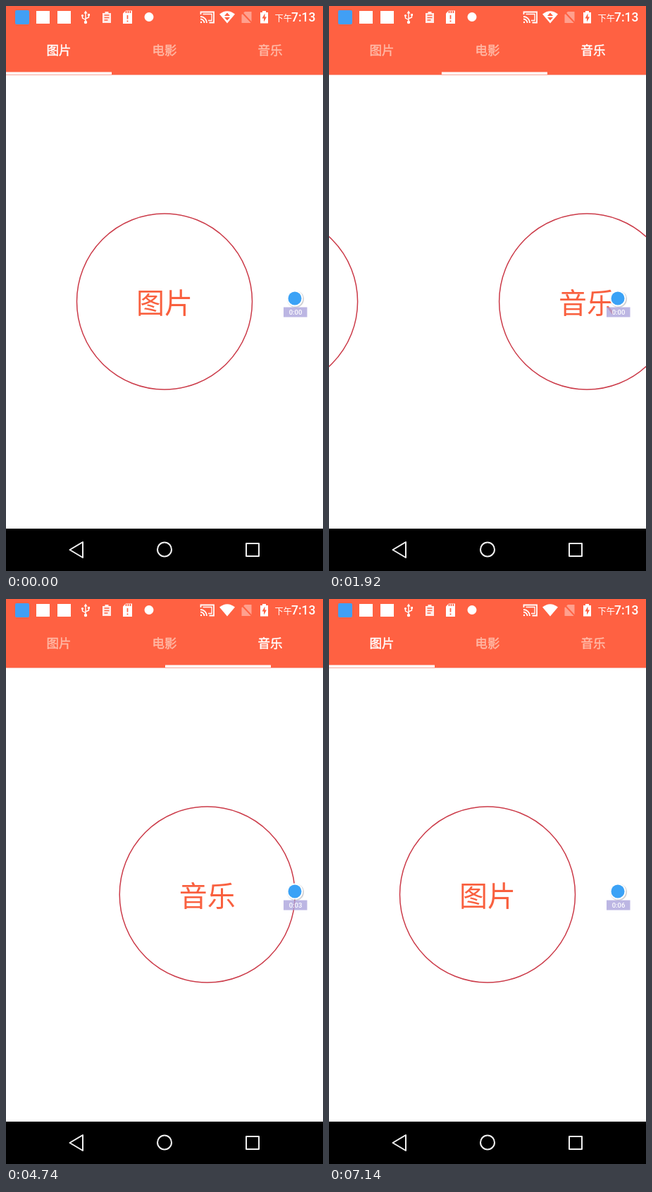
An HTML page for the animation above (7320 ms loop, 450 by 800 pixels).

```html
<!DOCTYPE html>
<html lang="zh-CN">
<head>
<meta charset="utf-8">
<title>Tabs</title>
<style>
html, body { margin: 0; width: 100%; height: 100%; overflow: hidden; background: #fff; }
svg { display: block; width: 100%; height: 100%; }
text { font-family: "Noto Sans CJK SC", "Noto Sans CJK", "Noto Sans", sans-serif; }
.tab { font-size: 17.5px; text-anchor: middle; stroke-width: .45; }
.label { font-size: 40px; text-anchor: middle; fill: #f9603f; }
.ring { fill: none; stroke: #cb3a48; stroke-width: 1.5; }
.clock { font-family: Roboto, sans-serif; font-size: 17.5px; font-weight: 500; }
.timer { font: 500 9.5px Roboto, sans-serif; text-anchor: middle; fill: #fff; }
</style>
</head>
<body>
<svg viewBox="0 0 450 800">
  <rect width="450" height="800" fill="#fff"/>
  <g id="pages"></g>

  <!-- tab bar -->
  <rect width="450" height="97.5" fill="#ff6142"/>
  <rect y="97" width="450" height="1" fill="#f7a79b"/>
  <g id="tabs"></g>
  <rect id="bar" y="93.5" width="150" height="3.5" fill="#fff"/>

  <!-- status bar, left -->
  <rect x="13" y="6" width="20" height="20" rx="2" fill="#419ff5"/>
  <rect x="43" y="7" width="19" height="18" fill="#fff"/>
  <rect x="73" y="7" width="19" height="18" fill="#fff"/>
  <g fill="none" stroke="#fff" stroke-width="1.4">
    <path d="M113 9V23M113 19.5L108.500 17V13.500M113 18L117.500 16V12.500"/>
    <path d="M110.500 10.500L113 6.500L115.500 10.500Z" fill="#fff" stroke="none"/>
    <circle cx="113" cy="23" r="2.200" fill="#fff" stroke="none"/>
    <circle cx="108.500" cy="13.500" r="1.600" fill="#fff" stroke="none"/>
    <rect x="116" y="11" width="3" height="3" fill="#fff" stroke="none"/>
  </g>
  <g opacity=".88">
    <path d="M137 10H140.500V8H145.500V10H149V24H137Z" fill="#fff"/>
    <path d="M139.500 13H146.500M139.500 16.500H146.500M139.500 20H144.500" stroke="#ff6142" stroke-width="1.300"/>
  </g>
  <path d="M170 6.500H179V25H166V10.500Z" fill="#fff"/>
  <path d="M172.500 13V18.500M172.500 20.500V22.500M170.500 7V10M173.500 7V10M176.500 7V10" stroke="#ff6142" stroke-width="1.700"/>
  <circle cx="203" cy="15.500" r="6.500" fill="#fff"/>

  <!-- status bar, right -->
  <g fill="none" stroke="#fff" stroke-width="1.800">
    <path d="M276.500 12V8.500H295V23.500H288.500"/>
    <path d="M276 15A9 9 0 0 1 285 24M276 18.500A5.500 5.500 0 0 1 281.500 24"/>
    <path d="M279.500 11.500H292V20.500H287" stroke-width="1.300"/>
    <circle cx="277" cy="23" r="1.200" fill="#fff" stroke="none"/>
  </g>
  <path d="M303 11.500Q314 3 325 11.500L314 24.500Z" fill="#fff"/>
  <path id="traffic" d="M310 14L314 9.500L318 14ZM310 16H318L314 20.500Z" fill="#ff6142"/>
  <g opacity=".4">
    <path d="M339 8H348.500V24H334.500V12.500Z" fill="#fff"/>
    <path d="M334 8L350 25" stroke="#ff6142" stroke-width="2"/>
  </g>
  <path d="M361 9H364V7H369V9H372V24.500H361Z" fill="#fff"/>
  <path d="M367.500 10.500L363.500 17.500H366V22.500L370 15.500H367.500Z" fill="#ff6142"/>
  <text x="381.500" y="21.500" font-size="12.300" fill="#fff">下午</text>
  <text class="clock" x="439.500" y="22" text-anchor="end" fill="#fff">7:13</text>

  <!-- floating recorder button -->
  <circle cx="411" cy="415" r="12" fill="#8c8c94" opacity=".4"/>
  <circle cx="410" cy="414" r="11.500" fill="#fff"/>
  <circle cx="410" cy="414" r="9.500" fill="#3ba2f6"/>
  <rect x="394" y="426.500" width="33.500" height="14" fill="#a9a2dc" opacity=".78"/>
  <text id="timer" class="timer" x="411" y="437"></text>

  <!-- navigation bar -->
  <rect y="740" width="450" height="60" fill="#000"/>
  <g fill="none" stroke="#f0f0f0" stroke-width="2" stroke-linejoin="round">
    <path d="M109 759V781L90.500 770Z"/>
    <circle cx="225" cy="769.500" r="10"/>
    <rect x="341" y="761" width="18" height="18"/>
  </g>
</svg>
<script>
const LOOP = 7320, STEP = 60, PAGE = 450, TAB = 150;
const names = ["图片", "电影", "音乐"];

// Tap time, resume time, settle time, from, to, progress at tap, progress per step
const moves = [
  [480, 660, 1680, 0, 1, .01, .045],
  [1680, 1740, 2460, 1, 2, .011, .049],
  [2820, 3660, 4080, 2, 0, .01, .1],
  [4080, 4560, 4980, 0, 2, .0168, .1],
  [4980, 5400, 5820, 2, 1, .01, .1],
  [5820, 6180, 6600, 1, 0, .01, .1]
];
const seconds = [[0, 0], [2820, 2], [4080, 3], [4980, 4], [5820, 5], [7140, 6]];

// The bar starts after the page and runs for a shorter part of the move
const BAR_DELAY = .138, BAR_SPAN = .4167;

const $ = id => document.getElementById(id);
const clamp = v => Math.min(1, Math.max(0, v));
const mix = (a, b, p) => a + (b - a) * p;
const quintOut = p => 1 - (1 - p) ** 5;
const cosInOut = p => (1 - Math.cos(Math.PI * p)) / 2;
const latest = (rows, now) => rows.filter(row => row[0] <= now).pop();

$("pages").innerHTML = names.map((name, i) => `
  <g transform="translate(${i * PAGE} 0)">
    <circle class="ring" cx="225" cy="418.5" r="124.5"/>
    <text class="label" x="225" y="435">${name}</text>
  </g>`).join("");
$("tabs").innerHTML = names.map((name, i) =>
  `<text class="tab" x="${(i + .5) * TAB}" y="69">${name}</text>`).join("");
const tabs = [...$("tabs").children];

function stateAt(now) {
  const move = latest(moves, now);
  if (!move) return { page: 0, bar: 0, active: 0 };
  const [tap, resume, settle, from, to, first, rate] = move;
  let p = first;
  if (now >= settle) p = 1;
  else if (now >= resume) p = clamp(first + rate * (1 + (now - resume) / STEP));
  return {
    page: mix(from, to, quintOut(p)),
    bar: mix(from, to, cosInOut(clamp((p - BAR_DELAY) / BAR_SPAN))),
    active: to
  };
}

function draw(time) {
  const now = Math.floor(time % LOOP / STEP) * STEP;
  const { page, bar, active } = stateAt(now);
  $("pages").setAttribute("transform", `translate(${-page * PAGE} 0)`);
  $("bar").setAttribute("x", bar * TAB);
  tabs.forEach((tab, i) => {
    const color = i === active ? "#fff" : "#ffb9a6";
    tab.setAttribute("fill", color);
    tab.setAttribute("stroke", color);
  });
  $("timer").textContent = "0:0" + latest(seconds, now)[1];
  $("traffic").style.display = now < 2820 ? "" : "none";
}

const start = performance.now();
function tick() {
  draw(performance.now() - start);
  requestAnimationFrame(tick);
}
tick();
</script>
</body>
</html>
```
